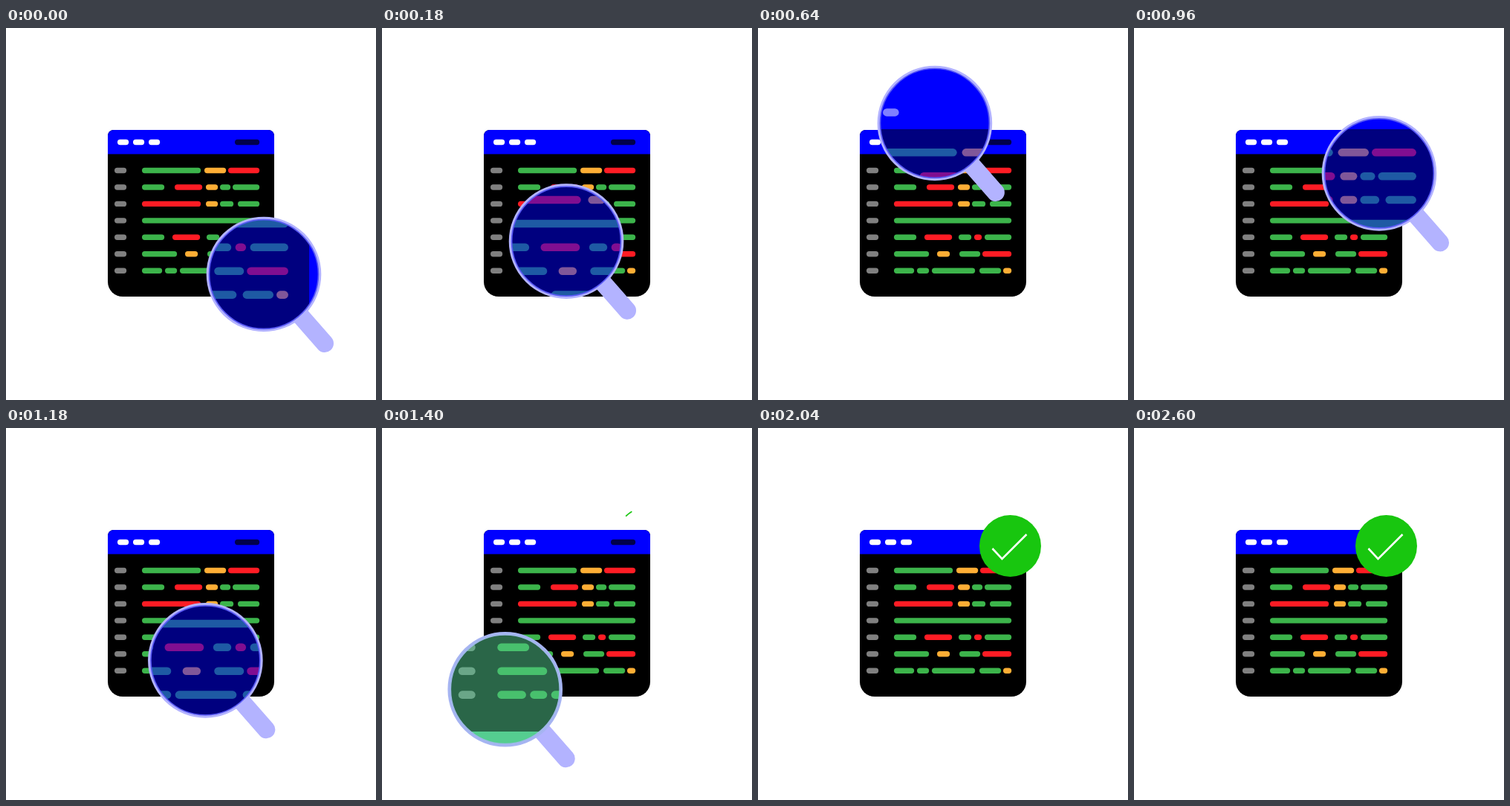
An HTML page for the animation above (2620 ms loop, 498 by 500 pixels).

```html
<!DOCTYPE html>
<html lang="en">
<head>
<meta charset="utf-8">
<title>Code check</title>
<style>
html, body { margin: 0; width: 100%; height: 100%; overflow: hidden; background: #fff; }
svg { display: block; width: 498px; height: 500px; }
.round { stroke-linecap: round; }
</style>
</head>
<body>
<svg viewBox="0 0 498 500">
  <defs>
    <clipPath id="glass"><circle id="hole" r="75"/></clipPath>
    <g id="win">
      <path d="M137 169V145a8 8 0 0 1 8-8H353a8 8 0 0 1 8 8V341a20 20 0 0 1-20 20H157a20 20 0 0 1-20-20Z"/>
      <path d="M137 169.5V145a8 8 0 0 1 8-8H353a8 8 0 0 1 8 8V169.5Z" fill="#00f"/>
      <g id="bars" class="round" stroke-width="7.4"></g>
    </g>
  </defs>
  <use href="#win"/>
  <g id="lens">
    <path id="handle" class="round" d="M46 52 82 93" stroke="#b3b3ff" stroke-width="24"/>
    <g clip-path="url(#glass)">
      <rect id="tint" width="498" height="500"/>
      <use href="#win" opacity=".5" transform="translate(249 249) scale(1.42) translate(-249 -249)"/>
    </g>
    <g id="rim" fill="none">
      <circle id="inner" r="73.8" stroke-width="2.4"/>
      <circle id="outer" r="75.8" stroke-width="3"/>
    </g>
  </g>
  <g transform="translate(339.5 158.5)">
    <g id="rays" stroke="#18c60f" stroke-width="1.8"></g>
    <path id="arc" fill="none" stroke="#18c60f" stroke-width="1.6" pathLength="100"
      d="M-11.4-39.9A41.5 41.5 0 1 1-11.5-39.8"/>
    <circle id="disc" r="41.5" fill="#18c60f"/>
    <path id="tick" d="M-24 3.5-11 17.3 22-15.5" fill="none" stroke="#fff" stroke-width="2.6"/>
  </g>
</svg>
<script>
const LOOP = 2620;
const $ = id => document.getElementById(id);
const NS = 'http://www.w3.org/2000/svg';

function line(parent, x1, y1, x2, y2, stroke) {
  const el = document.createElementNS(NS, 'line');
  const attrs = { x1, y1, x2, y2 };
  if (stroke) attrs.stroke = stroke;
  for (const k in attrs) el.setAttribute(k, attrs[k]);
  parent.append(el);
  return el;
}

// Code rows: colour letter followed by start-end.
const COLORS = { g: '#3cb44b', r: '#ff1c24', y: '#ffae35', e: '#808080', w: '#fff', n: '#00004b' };
const ROWS = [
  'w150-165 w171-186 w192-207 n308-341',
  'g183-262 y267-296 r299-341',
  'g183-213 r227-264 y269-285 g288-302 g305-341',
  'r183-262 y269-285 g288-306 g312-341',
  'g183-341',
  'g183-213 r224-261 g270-287 r291-301 g305-341',
  'g183-230 y241-258 g271-299 r302-341',
  'g183-210 g214-230 g234-292 g298-327 y330-341'
];
ROWS.forEach((row, i) => {
  const y = i ? 191.5 + (i - 1) * 22.45 : 153.5;
  for (const bar of ((i ? 'e146-162 ' : '') + row).split(' ')) {
    const [a, b] = bar.slice(1).split('-').map(Number);
    line($('bars'), a + 3.7, y, b - 3.5, y, COLORS[bar[0]]);
  }
});

const rays = Array.from({ length: 12 }, (_, i) => {
  const el = line($('rays'), 0, 0, 0, 0);
  el.setAttribute('transform', `rotate(${i * 30})`);
  return el;
});

// Lens path: time, x, y.
const PATH = [
  [0, 347, 331], [120, 294, 309], [230, 212, 265], [340, 165, 211], [400, 162, 186],
  [540, 198.5, 139.5], [640, 237.5, 128], [740, 279, 132], [850, 315, 155], [960, 330, 195],
  [1080, 312, 243], [1200, 259, 325], [1290, 210, 376], [1400, 166, 351.5], [1480, 158.5, 332],
  [1560, 158.5, 330]
];

function lensAt(t) {
  const last = PATH.length - 1;
  let i = 0;
  while (i < last - 1 && t > PATH[i + 1][0]) i++;
  const a = PATH[i], b = PATH[i + 1], h = b[0] - a[0];
  const u = Math.min(1, (t - a[0]) / h);
  const slope = (j, k) => j === 0 || j === last ? 0
    : (PATH[j + 1][k] - PATH[j - 1][k]) / (PATH[j + 1][0] - PATH[j - 1][0]);
  return [1, 2].map(k =>
    a[k] * (1 + 2 * u) * (1 - u) ** 2 + b[k] * u * u * (3 - 2 * u)
    + h * slope(i, k) * u * (1 - u) ** 2 + h * slope(i + 1, k) * u * u * (u - 1));
}

const part = (t, a, b) => Math.max(0, Math.min(1, (t - a) / (b - a)));
const smooth = u => u * u * (3 - 2 * u);
const out = u => 1 - (1 - u) ** 2;
const show = (el, on) => el.setAttribute('visibility', on ? 'visible' : 'hidden');
const mix = (a, b, u) => `rgb(${a.map((v, i) => Math.round(v + (b[i] - v) * u))})`;

function drawLens(t) {
  $('lens').setAttribute('display', t < 1560 ? 'inline' : 'none');
  if (t >= 1560) return;
  const [x, y] = lensAt(t), green = smooth(part(t, 1280, 1400));
  $('hole').setAttribute('cx', x);
  $('hole').setAttribute('cy', y);
  for (const id of ['handle', 'rim']) $(id).setAttribute('transform', `translate(${x} ${y})`);
  $('tint').setAttribute('fill', mix([0, 0, 255], [85, 205, 144], green));
  $('inner').setAttribute('stroke', mix([90, 90, 245], [158, 184, 232], green));
  $('outer').setAttribute('stroke', mix([179, 179, 255], [166, 180, 242], green));
  $('lens').setAttribute('opacity', 1 - smooth(part(t, 1440, 1560)));
}

function drawBadge(t) {
  const drawn = 100 * part(t, 1390, 1520) ** 1.3;
  $('arc').setAttribute('stroke-dasharray', `${drawn} 200`);
  show($('arc'), t > 1390 && t < 1540);

  const size = t < 1620 ? 1.265 * out(part(t, 1500, 1620))
    : 1 + 0.265 * (1 - smooth(part(t, 1620, 1840)));
  const tick = t < 1620 ? size * 0.913 : 1 + (size - 1) * 0.585;
  $('disc').setAttribute('transform', `scale(${size})`);
  $('tick').setAttribute('transform', `scale(${tick})`);
  show($('disc'), t > 1500);
  show($('tick'), t > 1500);

  const tip = t < 1620 ? 72 * part(t, 1540, 1620) : 72 + 59.5 * out(part(t, 1620, 1820));
  const tail = 131.5 * smooth(part(t, 1600, 1900));
  show($('rays'), t > 1540 && tail < tip);
  for (const ray of rays) {
    ray.setAttribute('x1', tail);
    ray.setAttribute('x2', tip);
  }
}

const start = performance.now();
function frame(now) {
  const t = Math.max(0, now - start) % LOOP;
  drawLens(t);
  drawBadge(t);
  requestAnimationFrame(frame);
}
frame(start);
</script>
</body>
</html>
```
